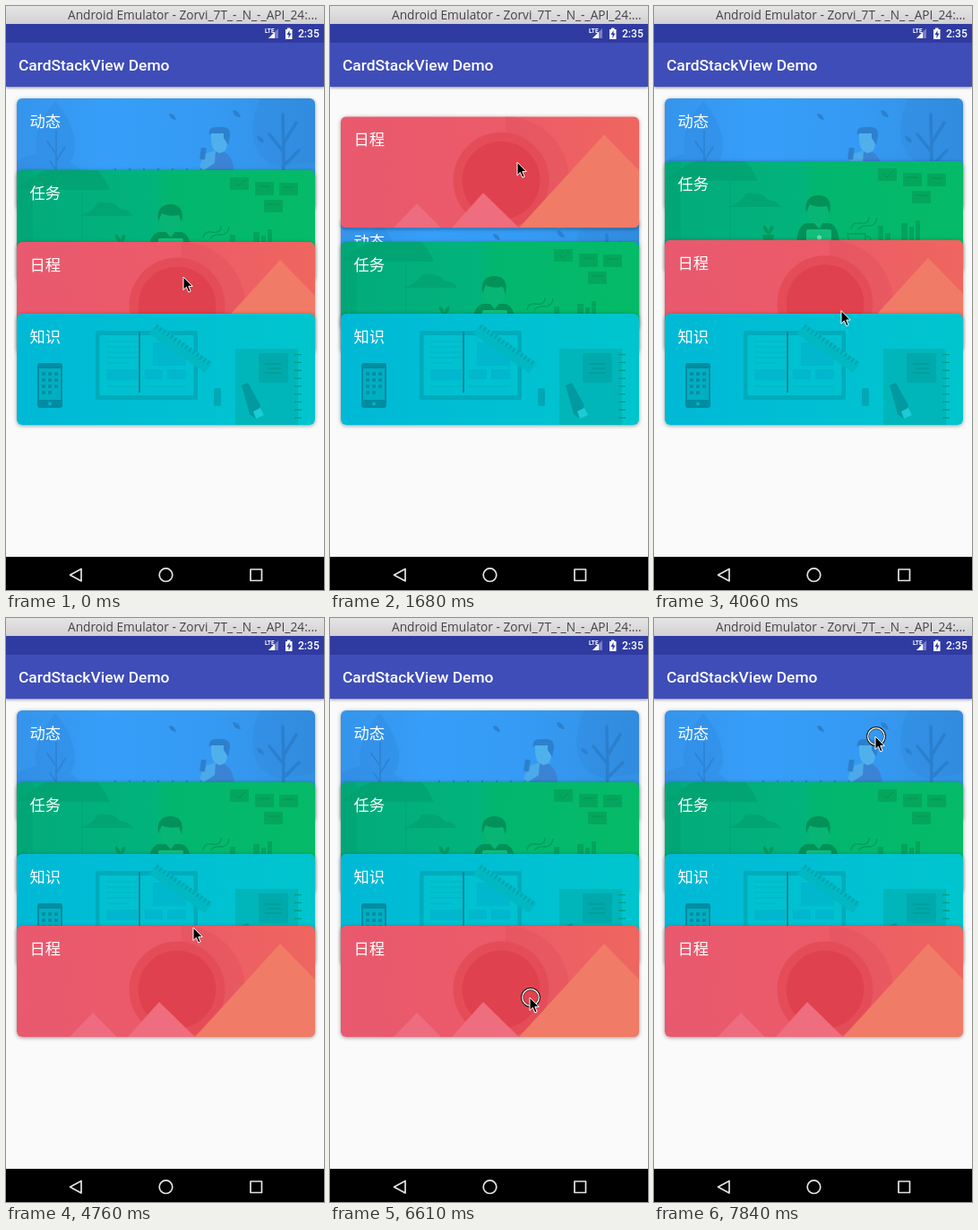
An HTML page that plays this animation: 355x651 px, repeating every 8 s.

```html
<!DOCTYPE html>
<html lang="zh">
<head>
<meta charset="utf-8">
<title>CardStackView Demo</title>
<style>
html, body { margin: 0; width: 100%; height: 100%; overflow: hidden; }
body { position: relative; background: #fafafa; }
svg { position: absolute; left: 0; top: 0; display: block; }
.bar { position: absolute; left: 0; width: 100%; z-index: 10; white-space: nowrap; color: #fff; }
.bar span { position: absolute; top: 0; }
#window { top: 0; height: 20px; background: linear-gradient(#e6e5e6, #d2d0d2); }
#window span { left: 69px; font: 13.7px/19px "Open Sans", sans-serif; color: #454345; }
#status { top: 20px; height: 21px; background: #303ba2; }
#status span { left: 326px; font: 500 12.1px/22px Roboto, sans-serif; }
#tool { top: 41px; height: 49px; z-index: 9; background: #3f4db8; box-shadow: 0 1px 3px rgba(0,0,0,.45); }
#tool span { left: 14px; font: 500 17.4px/50px Roboto, sans-serif; }
#nav { top: 614px; height: 37px; background: #000; }
#stack { position: absolute; inset: 0; z-index: 1; }
.card { position: absolute; left: 12px; top: 0; width: 333px; height: 124px; border-radius: 6px; box-shadow: 0 1px 4px rgba(0,0,0,.38); }
.card svg { border-radius: 6px; }
.card span { position: absolute; left: 14.5px; top: 12px; font: 17.3px/26px "Noto Sans CJK SC", "Noto Sans CJK", sans-serif; color: #fff; }
#cursor { z-index: 20; overflow: visible; }
</style>
</head>
<body>
<div id="window" class="bar"><span>Android Emulator - Zorvi_7T_-_N_-_API_24:...</span></div>
<div id="status" class="bar">
  <svg width="355" height="21" fill="#fff">
    <text x="289" y="9.5" font-family="Roboto, sans-serif" font-size="6.5" font-weight="700">LTE</text>
    <path d="M293 16L304 5V16Z" opacity=".35"/><path d="M293 16L300 9V16Z"/>
    <path d="M312 6h2V4.500h3.500V6h2V17h-7.500Z"/>
    <path d="M316.500 7l-3 5h2v4l3-5.500h-2Z" fill="#303ba2"/>
  </svg>
  <span>2:35</span>
</div>
<div id="tool" class="bar"><span>CardStackView Demo</span></div>

<div id="stack">
  <div class="card">
    <svg width="333" height="124">
      <linearGradient id="blue"><stop stop-color="#3594ec"/><stop offset=".3" stop-color="#369ef9"/><stop offset=".65" stop-color="#359af3"/><stop offset="1" stop-color="#338fe2"/></linearGradient>
      <rect width="333" height="124" fill="url(#blue)"/>
      <g fill="#2b83d4" opacity=".28">
        <path d="M43 3C66 30 78 72 44 78C8 72 20 30 43 3Z"/>
        <path d="M0 70Q38 48 74 82Q88 92 92 124H0Z"/>
        <path d="M333 0H272C258 28 258 70 296 76L333 70Z"/>
      </g>
      <g fill="none" stroke="#2b7fcd" stroke-linecap="round">
        <path d="M44 36V124M44 62L34 48M44 70L54 54M44 80L37 70" stroke-width="1.800" opacity=".75"/>
        <path d="M294 124C299 90 298 60 297 18M298 60L282 40M298 50L312 27M297 76L315 58" stroke-width="3.500"/>
        <path d="M106 82H206M106 90H206" stroke-width="2"/>
        <path d="M109 85H206" stroke-width="14" stroke-linecap="butt" stroke-dasharray="2 14"/>
      </g>
      <g fill="#2d80cd">
        <path d="M170 17q6-1 8 7q-7 0-8-7ZM241 13q7 0 9 8q-8 0-9-8ZM268 42q7 0 8 7q-7 0-8-7Z"/>
        <path d="M208 84Q209 59 226 58Q243 60 243 88V104H212Z" fill="#3b83d4"/>
        <path d="M210 62L222 58L221 72L209 80L204 76Z" fill="#4ca9e9"/>
        <path d="M217 36H235V50Q235 60 226 61Q217 58 217 46Z" fill="#4fb0ec"/>
        <path d="M215 41Q213 31 225 32Q239 30 238 42L236 52L231 44V39H217Z"/>
        <rect x="205" y="55" width="6" height="13" rx="1" transform="rotate(8 208 61)"/>
      </g>
    </svg><span>动态</span>
  </div>

  <div class="card">
    <svg width="333" height="124">
      <linearGradient id="green"><stop stop-color="#02ab7b"/><stop offset=".46" stop-color="#02b37c"/><stop offset=".5" stop-color="#02b66f"/><stop offset="1" stop-color="#05bb67"/></linearGradient>
      <rect width="333" height="124" fill="url(#green)"/>
      <g fill="#019a6b" opacity=".5">
        <path d="M0 21Q22 4 34 0H90Q98 8 104 22ZM70 51Q88 45 90 36Q110 34 115 43Q126 44 130 51Z"/>
        <path d="M0 0H18V124H0ZM72 22h1.500V124H72Z" opacity=".45"/>
      </g>
      <g fill="#04a65d">
        <path d="M238 8h21v14h-21ZM266 13h21v15h-21ZM293 14h21v14h-21ZM276 33h21v14h-21Z"/>
        <path d="M244 14l4 4 7-7M270 18h13M297 19h13M280 38h13" fill="none" stroke="#039653"/>
      </g>
      <g fill="#029a5b">
        <path d="M109 82h13l-2 13h-9ZM115 82q-8-8-4-11q5 4 5 10q0-10 5-9q2 4-5 10Z"/>
        <path d="M238 72h6V96h-6ZM246 80h6V96h-6ZM264 69h7V96h-7ZM273 73h5V96h-5ZM280 66h5V96h-5Z" opacity=".7"/>
        <path d="M204 81h20q1 13-10 14Q205 94 204 81ZM225 84q8 0 3 7M208 76q1-8 9-7q11 2 11-7M216 76q4-5 12-4q8 0 9-9" fill="none" stroke="#029c5a" stroke-width="1.300"/>
        <path d="M147 101Q146 72 158 69H184Q196 72 195 101Z" fill="#029158"/>
        <path d="M160 48H183V61Q180 70 171 70Q162 68 160 58Z" fill="#08b575"/>
        <path d="M158 57Q155 39 171 38Q188 38 184 58L181 50Q169 52 162 48Z" fill="#029158"/>
        <path d="M165 67h13l-6 8Z" fill="#08b575"/>
        <rect x="158" y="76" width="28" height="19" rx="2" fill="#13be7b"/>
        <circle cx="172.500" cy="85" r="2.500" fill="#65deac"/>
      </g>
    </svg><span>任务</span>
  </div>

  <div class="card">
    <svg width="333" height="124">
      <linearGradient id="red"><stop stop-color="#e9596f"/><stop offset=".55" stop-color="#eb5b68"/><stop offset="1" stop-color="#ef665f"/></linearGradient>
      <rect width="333" height="124" fill="url(#red)"/>
      <path d="M184 0A71 71 0 0 1 184 142Z" fill="#df505c" opacity=".42"/>
      <circle cx="179" cy="71" r="53.500" fill="#e44d58"/>
      <circle cx="179" cy="71" r="43.500" fill="#df424e"/>
      <path d="M199 124L294 20L333 60V124Z" fill="#f07b66"/>
      <path d="M124 124L159 85L199 124Z" fill="#ee6d7f"/>
      <path d="M59 124L85 97L112 124Z" fill="#ed6c80"/>
    </svg><span>日程</span>
  </div>

  <div class="card">
    <svg width="333" height="124">
      <linearGradient id="cyan"><stop stop-color="#00b9d6"/><stop offset=".5" stop-color="#00bfd3"/><stop offset="1" stop-color="#00c5cd"/></linearGradient>
      <rect width="333" height="124" fill="url(#cyan)"/>
      <rect x="88" y="19" width="114" height="77" rx="2" fill="#00abbb"/>
      <path d="M92.500 24H197.500V91H92.500Z" fill="#00c1d0"/>
      <path d="M100 62h35v12h-35ZM152 32h37v26h-37ZM143 62h20v11h-20ZM168 62h21v11h-21Z" fill="#00b7cd"/>
      <path d="M100 31h35M100 37h35M100 43h35M100 49h35M100 55h24M100 81h35M143 81h46" stroke="#00b3c5"/>
      <path d="M137 20V88" stroke="#00899a" stroke-width="2"/>
      <g transform="translate(156 11) rotate(35)">
        <rect width="76" height="14" fill="#00b7c2"/>
        <path d="M2 2.500H74" stroke="#0095a2" stroke-width="5" stroke-dasharray="1 4"/>
      </g>
      <rect x="23" y="55" width="28" height="50" rx="3" fill="#018ca1"/>
      <path d="M25 61H49V96H25Z" fill="#00afc2"/>
      <path d="M28 67H46M28 74H46M28 81H46M28 88H40" stroke="#018ca1" stroke-width="3.500" stroke-dasharray="4 3"/>
      <circle cx="37" cy="100.500" r="2" fill="#00b5c7"/>
      <path d="M244 39H314V124H244Z" fill="#00b6ba"/>
      <rect x="270" y="44" width="33" height="33" rx="2" fill="#00a9ab"/>
      <path d="M277 56h18M281 61h14M277 66h18" stroke="#00938a"/>
      <path d="M314 45V124" stroke="#009c80" stroke-width="8" stroke-dasharray="1.300 7.500"/>
      <path d="M251 80L258 77L272 102L267 117L260 112Z" fill="#009aa0"/>
      <path d="M264 109L272 105L276 113L267 117Z" fill="#1ccbd6"/>
      <rect x="220" y="83" width="8" height="20" rx="2" fill="#00a8b4"/>
    </svg><span>知识</span>
  </div>
</div>

<div id="nav" class="bar">
  <svg width="355" height="37" fill="none" stroke="#e4e4e4" stroke-width="1.700" stroke-linejoin="round">
    <path d="M84 13.500V27L71.500 20.200ZM273 14h12.500V26.500H273Z"/><circle cx="178.500" cy="20.200" r="7.300"/>
  </svg>
</div>

<svg id="cursor" width="1" height="1">
  <g id="ring" fill="none"><circle cx="1" r="9.500" stroke="#111" stroke-width="2.800"/><circle cx="1" r="9.300" stroke="#fff" stroke-width="1.300"/></g>
  <path d="M0 0V14.500L3.400 11.300L5.800 17L8.200 16L5.800 10.400H10.300Z" fill="#000" stroke="#fff"/>
</svg>

<script>
const LOOP = 8000, TOP = 103, SLOT = 80;
const [news, task, plan, know] = document.querySelectorAll('.card');
const cursor = document.getElementById('cursor');
const ring = document.getElementById('ring');

// Hand moves: start, end, slots the plan card travels, change of cursor height on it
const moves = [
  [60, 270, -.3, 0], [500, 1150, -.7, 0], [1300, 1810, -1, 16],
  [2100, 2865, 1, 6], [3000, 3530, .87, 18], [3790, 4060, .1, 0], [4060, 4590, 1.03, -77],
  [4900, 6100, 0, 65], [6100, 6440, 0, 13], [6940, 7400, 0, -326], [7450, 7840, 0, 35]
];

const ramp = (t, a, b) => Math.min(1, Math.max(0, (t - a) / (b - a)));
const ease = (t, a, b) => { const u = ramp(t, a, b); return u * u * (3 - 2 * u); };
const total = (t, col) => moves.reduce((sum, m) => sum + m[col] * ramp(t, m[0], m[1]), 0);

// A card makes way by one slot, goes too far by `extra` and drops in place at `end`
function yieldSlot(t, start, end, dir, extra) {
  const go = ease(t, start, start + 250);
  return dir * (SLOT * go + extra * (go - ease(t, end - 100, end)));
}
// Pulling the stack widens every gap, letting go closes it
const pull = (t, start, peak, end, size) => size * (ease(t, start, peak) - ease(t, peak, end));
const between = (t, a, b) => t >= a && t < b;

function place(card, slot, offset, z) {
  const y = TOP + SLOT * slot + offset;
  card.style.transform = `translateY(${y}px)`;
  card.style.zIndex = z;
  return y;
}

function draw(now) {
  const t = now % LOOP;
  const gap = pull(t, 4860, 6100, 6400, 19.6) + pull(t, 6610, 6940, 7500, 13.5);
  const slot = 2 + total(t, 2);

  place(news, 0, yieldSlot(t, 1430, 1850, 1, 54) + yieldSlot(t, 2300, 2840, -1, 10), 1);
  place(task, 1, yieldSlot(t, 680, 1130, 1, 56) + yieldSlot(t, 3140, 4250, -1, 10) + gap, 3);
  place(know, 3, yieldSlot(t, 4140, 4760, -1, 10) + 2 * gap, 5);
  const planY = place(plan, slot, 3 * gap, 2 * Math.ceil(slot - .01));

  const x = 198 + 11 * ramp(t, 60, 1500) + 14 * ease(t, 4900, 6440) + 24 * ease(t, 6940, 7400);
  cursor.style.transform = `translate(${x}px, ${planY + 39 + total(t, 3)}px)`;
  const pressed = between(t, 4850, 6100) || between(t, 6500, 6940) || t >= 7400;
  ring.style.display = pressed ? '' : 'none';
  requestAnimationFrame(draw);
}
requestAnimationFrame(draw);
</script>
</body>
</html>
```
